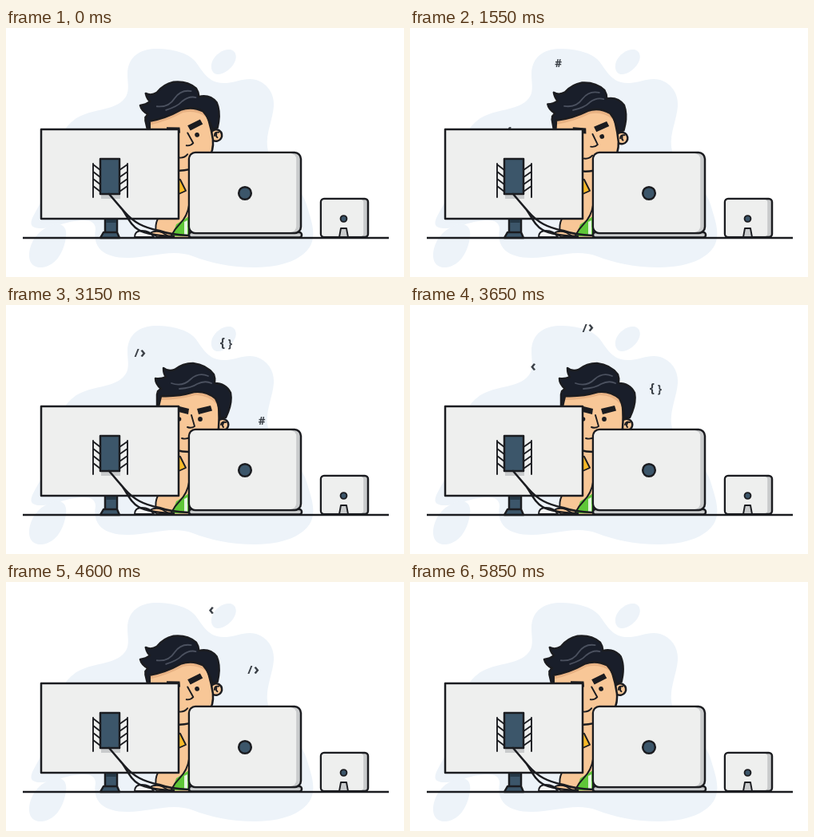
These frames come from a looping animation (498x312 px, 5.9 s). An HTML page:

```html
<!DOCTYPE html>
<html lang="en">
<head>
<meta charset="utf-8">
<title>Coding at the desk</title>
<style>
  html, body { margin: 0; width: 100%; height: 100%; overflow: hidden; background: #fff; }
  svg { display: block; width: 498px; height: 312px; }
  text { font: 700 13.5px "Open Sans", sans-serif; fill: #3b4047; text-anchor: middle; }
  .ink { stroke: #1b1c20; stroke-width: 2.5; stroke-linejoin: round; stroke-linecap: round; }
  .thin { stroke-width: 1.9; }
  .line { fill: none; }
  .blob { fill: #edf3f9; }
  .skin { fill: #f8c797; }
  .shell { fill: #eeefee; }
  .shade { fill: #c9cbcc; }
  .steel { fill: #3c566a; }
  .hair { fill: #191e2a; }
</style>
</head>
<body>
<svg viewBox="0 0 498 312" xmlns="http://www.w3.org/2000/svg">
  <g class="blob">
    <path d="M152 58C152 36 168 26 188 26C208 26 228 31 237 42C246 54 253 69 272 69C288 69 299 61 313 65C328 70 336 83 335 98C334 114 325 132 327 149C330 178 367 191 376 221C380 235 386 250 384 263C381 286 351 300 312 300C280 300 255 294 234 286C207 276 182 288 152 288C122 288 108 275 112 252C112 244 106 241 98 241C75 241 62 251 44 251C31 251 29 246 34 236C44 217 58 197 61 165C63 143 70 126 88 113C108 101 132 104 146 91C156 82 152 70 152 58Z"/>
    <path d="M58 247C70 243 77 250 75 262C73 278 64 298 45 300C30 301 26 288 31 273C36 259 46 251 58 247Z"/>
    <path d="M258 42C262 33 271 27 279 27C287 27 290 35 286 43C282 51 273 58 265 58C258 58 255 50 258 42Z"/>
  </g>

  <g id="symbols">
    <g><text y="4.500">#</text></g>
    <g><text x="-4" y="4.500" style="font-size:16px">{</text><text x="5.500" y="4.500">}</text></g>
    <g><text x="-4" y="5" style="font-size:15px">/</text><text x="4" y="5.500" style="font-size:20px">›</text></g>
    <g><text y="5.500" style="font-size:20px">‹</text></g>
  </g>

  <g id="body">
    <path class="skin" d="M200 165H232V262H188V238L205 215Z"/>
    <path d="M214 189L218 190L225 204L216 208Z" fill="#f9ba28" class="ink thin"/>
    <path d="M208 260L213 246L229 236V261H208Z" fill="#5fc738"/>
    <path d="M223 243L227 241V260H223Z" fill="#e4f5de"/>
    <path class="ink thin line" d="M229 222Q227 236 217 246Q211 252 207 260M188 256Q186 247 190 239M229 188V261"/>
  </g>

  <g id="head">
    <circle class="skin ink" cx="271" cy="150" r="7.300"/>
    <path class="ink thin line" d="M269 150Q270 145 275 147M272 148Q270 151 272 153"/>
    <path class="skin ink" d="M190 108H263Q268 130 266 154Q262 183 229 184Q194 184 190 150Z"/>
    <path d="M193 115Q213 115 235 109Q254 107 262 118L264 125Q254 113 237 113Q216 119 193 119Z" fill="#e8b283"/>
    <path class="hair ink" d="M187 92Q194 93 200 90Q197 86 197 79Q203 84 211 81Q221 73 234 73Q251 75 260 87Q262 92 261 98Q275 98 281 110Q283 121 278 134L275 141L268 142Q268 128 262 117Q250 107 235 109Q215 115 194 114L191 127H189V112Q190 107 194 105Q187 99 187 92Z"/>
    <path d="M207 98Q221 103 231 93Q241 84 253 89M217 105Q232 104 239 99Q249 94 257 98" fill="none" stroke="#4b515f" stroke-width="1.800" stroke-linecap="round"/>
    <path d="M213 126L229 130L228 137L212 133ZM239 130L256 126L258 132.500L241 137Z" fill="#1b1c20"/>
    <g id="face">
      <circle cx="216.500" cy="143" r="2.800" fill="#1b1c20"/>
      <circle cx="243" cy="143" r="2.900" fill="#1b1c20"/>
      <path class="ink thin line" d="M232 138L236 152Q232 155 227 153"/>
    </g>
    <path class="ink thin line" d="M220 167Q226 169 231 165"/>
  </g>

  <path class="ink thin" d="M161 262Q161 254 170 254Q180 254 185 262Z" fill="#f4f5f5"/>
  <path class="skin ink thin" d="M180 257Q187 253 195 256L205 262H190Z"/>

  <g id="monitor">
    <path class="steel ink" d="M124 239H139V256H124ZM122 256H139L142 263H118Z"/>
    <path d="M125 240H138V244H125Z" fill="#263947"/>
    <rect class="shell ink" x="44" y="127" width="172" height="112"/>
    <rect class="shade" x="119" y="207" width="24" height="7"/>
    <path id="ribs" class="ink thin line"/>
    <rect class="steel ink" x="118" y="164" width="24" height="44"/>
    <path class="ink line" d="M129 208L148 230C160 244 172 250 192 254Q206 259 229 260M129 208L146 228C153 238 156 247 166 253Q178 260 210 261"/>
  </g>

  <g id="laptop">
    <rect class="shade ink" x="229" y="256" width="141" height="6.500" rx="3"/>
    <rect class="shade ink" x="229" y="156" width="140" height="101" rx="8"/>
    <rect class="shell" x="230.200" y="157.200" width="133" height="98.600" rx="7"/>
    <circle class="steel ink" cx="299" cy="207" r="7.800"/>
  </g>

  <g id="tablet">
    <rect class="shade ink" x="394" y="214" width="59" height="48" rx="4"/>
    <rect class="shell" x="395.200" y="215.200" width="52" height="45.600" rx="3"/>
    <circle class="steel ink thin" cx="422.500" cy="239" r="3.900"/>
    <path class="shade ink thin" d="M419 251H426L428 262H417Z"/>
  </g>
  <path class="ink line" style="stroke-linecap:butt" d="M21 263H479"/>
</svg>
<script>
  const LOOP = 5900, STEP = 50;
  const byId = id => document.getElementById(id);
  const symbols = [...byId("symbols").children];
  const starts = [0, 900, 1800, 2500];

  // Time since launch, x, y along the arc from monitor to laptop
  const arc = [
    [450, 121, 154], [650, 128, 131], [850, 137, 106], [1350, 167.5, 60],
    [1600, 191, 41], [1930, 233, 28], [2250, 275, 48.5],
    [2750, 307, 105], [3150, 320, 145], [3600, 331, 194]
  ];

  const slope = (i, axis) => {
    const a = arc[Math.max(0, i - 1)], b = arc[Math.min(arc.length - 1, i + 1)];
    return (b[axis] - a[axis]) / (b[0] - a[0]);
  };

  function along(age, axis) {
    let i = 0;
    while (i < arc.length - 2 && age > arc[i + 1][0]) i++;
    const [a, b] = [arc[i], arc[i + 1]];
    const span = b[0] - a[0], u = (age - a[0]) / span, v = 1 - u;
    return v * v * (1 + 2 * u) * a[axis] + u * u * (3 - 2 * u) * b[axis]
      + u * v * span * (v * slope(i, axis) - u * slope(i + 1, axis));
  }

  function ease(t, from, to) {
    const u = Math.min(1, Math.max(0, (t - from) / (to - from)));
    return u * u * (3 - 2 * u);
  }

  function draw(t) {
    symbols.forEach((symbol, i) => {
      const age = t - starts[i];
      const visible = age >= arc[0][0] && age <= arc[arc.length - 1][0];
      symbol.style.display = visible ? "" : "none";
      if (visible) symbol.setAttribute("transform", `translate(${along(age, 1)} ${along(age, 2)})`);
    });
    const lean = 1 - ease(t, 1300, 2100) + ease(t, 3700, 4500);
    byId("head").setAttribute("transform", `rotate(${-13 * lean} 199 178)`);
    byId("face").setAttribute("transform", `translate(${5 * lean} ${lean})`);
  }

  const slats = [0, 1, 2, 3].map(i => {
    const y = 171 + i * 9;
    return `M109 ${y}L118 ${y + 7}M152 ${y}L142 ${y + 7}`;
  }).join("");
  byId("ribs").setAttribute("d", `M109 170V212M152 170V212${slats}`);

  const origin = performance.now();
  function tick() {
    const t = (performance.now() - origin) % LOOP;
    draw(Math.floor(t / STEP) * STEP);
    requestAnimationFrame(tick);
  }
  draw(0);
  requestAnimationFrame(tick);
</script>
</body>
</html>
```
